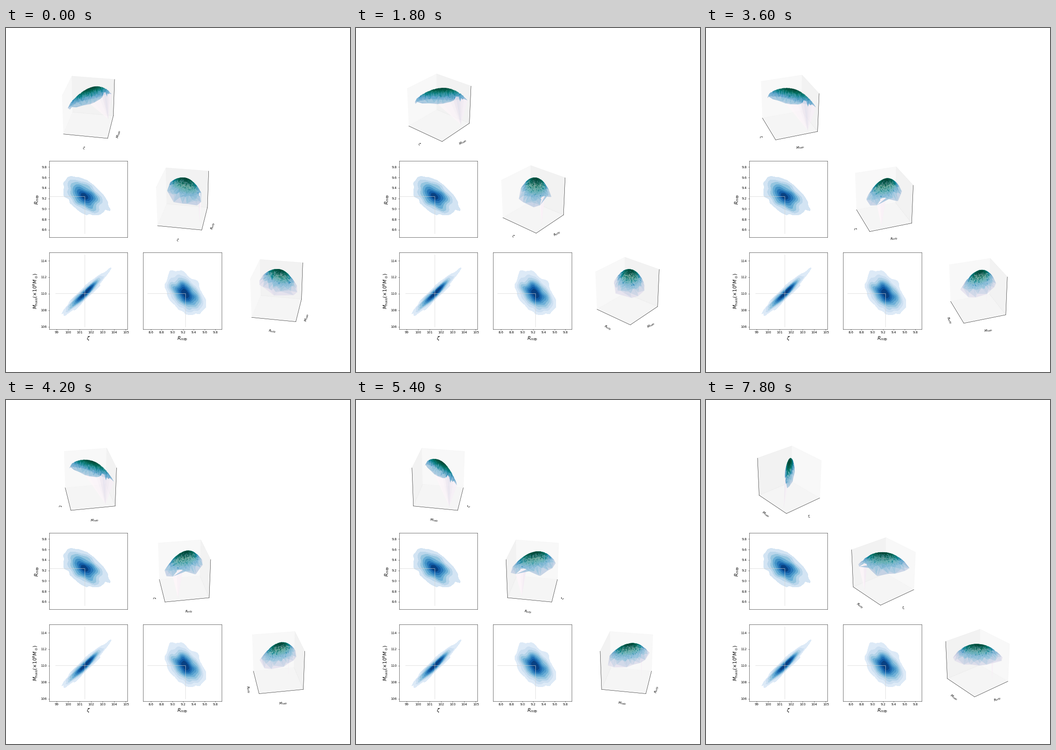
Write a matplotlib script that moves like this. It is 748 by 748 pixels and loops after 8 s.

```python
import numpy as np
import matplotlib.pyplot as plt
from matplotlib.animation import FuncAnimation

SIZE, DPI = 748, 50
NAMES = [r"$\zeta$", r"$R_{mfp}$", r"$M_{halo}$"]
LIMITS = [(98.35, 105.14), (8.456, 9.916), (105.74, 114.98)]
TICKS = [np.arange(99, 106), np.arange(8.6, 9.9, 0.2), np.arange(106, 115, 2)]
TRUTH = [101.43, 9.243, 110.03]
LINE_START = [98.88, 8.53, 106.0]

# one correlated chain feeds both the density panels and the surfaces
CORR = np.array([[1, -0.45, 0.95], [-0.45, 1, -0.42], [0.95, -0.42, 1]])
MEAN = np.array([101.47, 9.24, 110.07])
SIGMA = np.array([0.86, 0.157, 1.2])


def chi2(d, cov):
    return np.einsum("...i,ij,...j->...", d, np.linalg.inv(cov), d)


rng = np.random.default_rng(4)
chain = rng.multivariate_normal(np.zeros(3), CORR, 2500)
chain = chain[chi2(chain, CORR) < 13][:2100]
total = chi2(chain, CORR)

fig = plt.figure(figsize=(SIZE / DPI, SIZE / DPI), dpi=DPI, facecolor="white")
grid = fig.add_gridspec(3, 3, left=0.125, right=0.9, bottom=0.125, top=0.88,
                        wspace=0.2, hspace=0.2)


def density(pair, width=0.28, count=800):
    """Kernel density of the chain, scaled to a peak of one."""
    cov = CORR[np.ix_(pair, pair)] * width ** 2
    axis = np.linspace(-3.6, 3.6, 90)
    gx, gy = np.meshgrid(axis, axis)
    nodes = np.stack([gx, gy], -1)
    p = sum(np.exp(-chi2(nodes - s, cov) / 2) for s in chain[:count, pair])
    x, y = (MEAN[k] + SIGMA[k] * axis for k in pair)
    return x, y, p / p.max()


def panel(cell, i, j, count, light, bottom, left):
    ax = fig.add_subplot(cell)
    ax.set(xlim=LIMITS[i], ylim=LIMITS[j],
           xticks=TICKS[i] if bottom else [], yticks=TICKS[j] if left else [])
    if bottom:
        ax.set_xlabel(NAMES[i], fontsize=15)
    if left:
        unit = r"$(\times10^{8}M_\odot)$" if j == 2 else ""
        ax.set_ylabel((NAMES[j] + unit).replace("$$", ""), fontsize=15)
    shades = plt.cm.Blues(np.linspace(light, 0.94, count))
    ax.contourf(*density([i, j]), levels=np.linspace(0.085, 1.001, count + 1),
                colors=shades)
    return ax


def cross(ax, i, j, x_span, y_span):
    style = dict(color="lightgray", linewidth=1, zorder=5)
    ax.hlines(TRUTH[j], *x_span, **style)
    ax.vlines(TRUTH[i], *y_span, **style)


ax = panel(grid[1, 0], 0, 1, 8, 0.18, False, True)
cross(ax, 0, 1, (LIMITS[0][0], TRUTH[0]), (LINE_START[1], TRUTH[1]))
ax = panel(grid[2, 0], 0, 2, 10, 0.13, True, True)
cross(ax, 0, 2, (LINE_START[0], LIMITS[0][1]), (LINE_START[2], 114.78))
ax = panel(grid[2, 1], 1, 2, 10, 0.13, True, False)
cross(ax, 1, 2, (LINE_START[1], TRUTH[1]), (LINE_START[2], TRUTH[2]))

# surface points in a unit box, with one stray point on its floor
PEAK = np.array([0.05, 0.05, 0.06])
STRAY = np.array([0.42, -0.2, 0.31])
spread = 0.15 * np.where(chain > 0, 0.91, 1.09)
places = np.vstack([np.clip(PEAK + chain * spread, -0.5, 0.5), STRAY])


def surface(cell, i, j, noise):
    pair = [i, j]
    shown = chi2(chain[:, pair], CORR[np.ix_(pair, pair)])
    height = 0.5 - (shown + noise * (total - shown)) / 28
    ax = fig.add_subplot(cell, projection="3d")
    ax.plot_trisurf(places[:, i], places[:, j], np.r_[height, -0.5],
                    cmap="PuBuGn", alpha=0.65, linewidth=0.5)
    edge = 0.5 + 1 / 48
    ax.set(xlim=(-edge, edge), ylim=(-edge, edge), zlim=(-edge, edge),
           xticks=[], yticks=[], zticks=[], xlabel=NAMES[i], ylabel=NAMES[j])
    ax.patch.set_visible(False)
    ax.set_box_aspect((1, 1, 1), zoom=0.94676)
    # fill the whole cell instead of a square inside it
    ax.apply_aspect = lambda position=None: None
    return ax


domes = [surface(grid[0, 0], 0, 2, 0.6),
         surface(grid[1, 1], 0, 1, 0.3),
         surface(grid[2, 2], 1, 2, 0.3)]


def update(i):
    for ax in domes:
        ax.view_init(elev=30, azim=-80 + 10 * (i // 3))
    return domes


anim = FuncAnimation(fig, update, frames=40, interval=200, repeat=True,
                     repeat_delay=0, blit=False)
plt.show()
```
